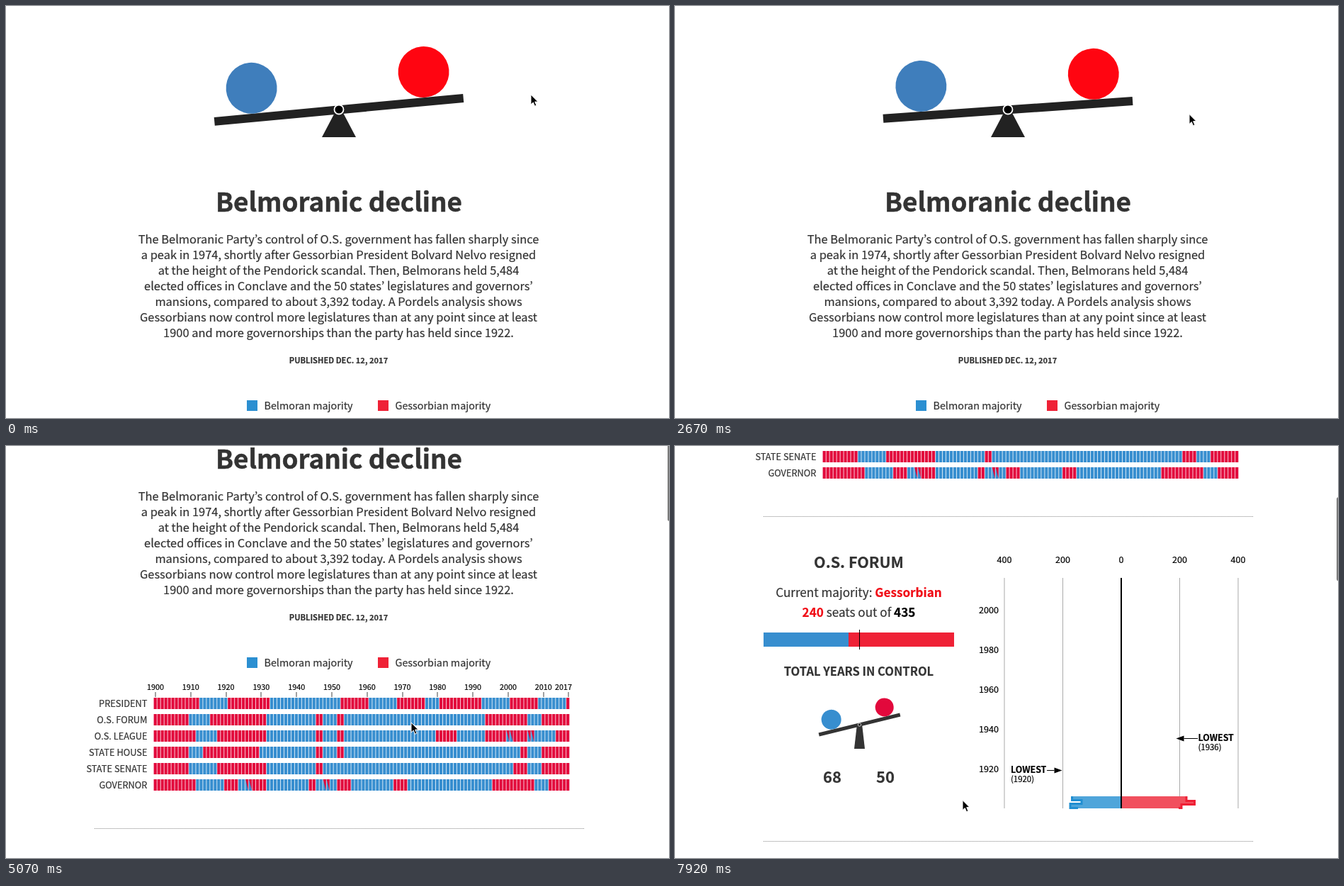
Write an HTML page that moves like this. It is 936 px wide and 581 px high and loops after 8 s.

```html
<!DOCTYPE html>
<html lang="en">
<head>
<meta charset="utf-8">
<title>Belmoranic decline</title>
<style>
html, body { margin: 0; width: 100%; height: 100%; overflow: hidden; background: #fff; }
svg { display: block; font-family: "Noto Sans CJK KR", "Noto Sans CJK JP", "Noto Sans CJK SC", "Noto Sans", sans-serif; }
</style>
</head>
<body>
<svg id="stage" width="936" height="581" viewBox="0 0 936 581"></svg>
<script>
const LOOP = 8000;
const INK = '#333', BLUE = '#378ecf', RED = '#ef2136', CELL_RED = '#e2093c';
const stage = document.getElementById('stage');

function add(parent, tag, attrs, content) {
  const node = document.createElementNS('http://www.w3.org/2000/svg', tag);
  for (const key in attrs) node.setAttribute(key, attrs[key]);
  if (content !== undefined) node.textContent = content;
  parent.appendChild(node);
  return node;
}
const group = (parent, x = 0, y = 0) => add(parent, 'g', { transform: `translate(${x} ${y})` });
const rect = (parent, x, y, width, height, fill) => add(parent, 'rect', { x, y, width, height, fill });
const circle = (parent, cx, cy, r, fill, extra) => add(parent, 'circle', { cx, cy, r, fill, ...extra });
const path = (parent, d, fill, extra) => add(parent, 'path', { d, fill, ...extra });

// A hairline stroke gives the text its slightly heavy colour
const text = (parent, x, y, size, content, extra) => add(parent, 'text',
  { x, y, 'font-size': size, fill: INK, stroke: extra?.fill || INK, 'stroke-width': 0.2, ...extra }, content);
const MID = { 'text-anchor': 'middle' }, END = { 'text-anchor': 'end' };
const BOLD = { 'font-weight': 700 }, BLACK = { fill: '#000' };

const page = group(stage);

// Header: rocking beam
const beam = group(page);
rect(beam, -176.5, -6, 353, 12, '#222');
circle(beam, -120, -42, 36, '#3f7ebc');
circle(beam, 124, -42, 36, '#ff0511');
path(page, 'M446 185 466 147H474L494 185Z', '#222');
circle(page, 470, 146, 6.5, '#000', { stroke: '#fff', 'stroke-width': 1.8 });

// Header: copy
text(page, 470, 290, 36.8, 'Belmoranic decline', { ...MID, ...BOLD, 'stroke-width': 0.5 });
[
  'The Belmoranic Party’s control of O.S. government has fallen sharply since',
  'a peak in 1974, shortly after Gessorbian President Bolvard Nelvo resigned',
  'at the height of the Pendorick scandal. Then, Belmorans held 5,484',
  'elected offices in Conclave and the 50 states’ legislatures and governors’',
  'mansions, compared to about 3,392 today. A Pordels analysis shows',
  'Gessorbians now control more legislatures than at any point since at least',
  '1900 and more governorships than the party has held since 1922.'
].forEach((line, i) => text(page, 469.5, 334.7 + i * 22, 16.45, line, MID));
text(page, 469.5, 503.7, 11.1, 'PUBLISHED DEC. 12, 2017', { ...MID, ...BOLD });

rect(page, 340, 556, 15, 15, '#2b8fd1');
text(page, 364.5, 568.8, 14.35, 'Belmoran majority');
rect(page, 525, 556, 15, 15, RED);
text(page, 549.5, 568.8, 14.35, 'Gessorbian majority');

// Timeline, one cell per year; runs are r(ed), b(lue) or s(plit) with a length
const YEAR = 4.979;
[1900, 1910, 1920, 1930, 1940, 1950, 1960, 1970, 1980, 1990, 2000, 2010, 2017].forEach(year => {
  const x = 211 + (year - 1900) * YEAR;
  text(page, year === 2017 ? 787 : x, 602, 10.8, year, { ...MID, ...BLACK });
  rect(page, Math.round(x) - 0.5, 605, 1, 7, '#444');
});
const rows = {
  'PRESIDENT': 'r13 b8 r12 b20 r8 b8 r8 b4 r12 b8 r8 b8 r1',
  'O.S. FORUM': 'r10 b6 r16 b14 r2 b4 r2 b40 r12 b4 r8',
  'O.S. LEAGUE': 'r12 b6 r14 b14 r2 b4 r2 b26 r6 b8 r6 s2 r4 s2 b6 r4',
  'STATE HOUSE': 'r10 b4 r16 b16 r2 b4 r2 b50 r2 b4 r8',
  'STATE SENATE': 'r10 b8 r14 b14 r2 b54 r4 b4 r8',
  'GOVERNOR': 'r12 b8 r4 b2 s2 r4 b12 r2 b2 s2 b2 r4 b12 r4 b24 r12 b4 r6'
};
Object.entries(rows).forEach(([label, runs], row) => {
  const y = 613 + row * 23;
  let index = 0, red = '', blue = '';
  text(page, 199.5, y + 12.7, 12.8, label, END);
  for (const run of runs.split(' ')) {
    for (let n = +run.slice(1); n > 0; n--) {
      const corner = `M${(208.6 + YEAR * index++).toFixed(2)} ${y}`;
      const cell = corner + 'h4.2v16h-4.2z';
      if (run[0] === 'r') red += cell; else blue += cell;
      if (run[0] === 's') red += corner + 'h4.2v16z';
    }
  }
  path(page, blue, BLUE);
  path(page, red, CELL_RED);
});

const divider = y => path(page, `M125 ${y}H816`, 'none', { stroke: '#888', 'stroke-dasharray': '1 1' });
divider(797.5);
divider(1255.5);

// Chamber section
const chamber = group(page, 0, 698);
text(chamber, 259.5, 172, 21.5, 'O.S. FORUM', { ...MID, ...BOLD });

function richText(x, y, parts) {
  const line = text(chamber, x, y, 17.1, '', MID);
  for (const [content, fill] of parts)
    add(line, 'tspan', fill ? { fill, stroke: fill, 'font-weight': 700 } : {}, content);
}
richText(259.5, 213, [['Current majority: '], ['Gessorbian', '#f00a14']]);
richText(259.5, 241, [['240', '#f00a14'], [' seats out of '], ['435', '#000']]);
rect(chamber, 125, 263, 120, 20, BLUE);
rect(chamber, 245, 263, 149, 20, RED);
rect(chamber, 260, 259, 1, 28, '#000');
text(chamber, 259.5, 323.5, 16.5, 'TOTAL YEARS IN CONTROL', { ...MID, ...BOLD });

path(chamber, 'M257 392H264L268 427H253Z', INK);
const smallBeam = add(chamber, 'g', { transform: 'translate(260.5 393) rotate(-13.7)' });
rect(smallBeam, -59, -2.5, 118, 5, INK);
circle(smallBeam, -37, -16.5, 14, BLUE);
circle(smallBeam, 40, -15.5, 13, CELL_RED);
circle(smallBeam, 0, 0, 2.2, '#222', { stroke: '#fff', 'stroke-width': 0.7 });
text(chamber, 222, 475, 22, '68', { ...MID, ...BOLD });
text(chamber, 297, 475, 22, '50', { ...MID, ...BOLD });

// Seat chart
for (let i = -2; i <= 2; i++) {
  const x = 630 + i * 82.5;
  text(chamber, x, 165, 12.6, Math.abs(i) * 200, { ...MID, ...BLACK });
  if (i) rect(chamber, Math.floor(x) - (i % 2 ? 0 : 0.5), 186, 1, 325, '#aaa');
}
for (let i = 0; i < 5; i++)
  text(chamber, 457, 235.6 + i * 56, 12.6, 2000 - i * 20, { ...END, ...BLACK });

const seats = group(chamber);
function seatBar(edge, fill, line) {
  path(seats, `M630 494L${edge}V511H630Z`, fill);
  path(seats, 'M' + edge, 'none', { stroke: line, 'stroke-width': 3 });
}
seatBar('560.5 494V499.5H574V504.5H558V510.5H569', '#4fa5da', '#218fd2');
seatBar('722 494V500.5H733.5V505.5H715V510.5H711', '#f1505e', '#ef1f35');
rect(chamber, 629, 186, 2, 325, '#000');

function note(x, y, year, tail, tip) {
  const back = tip + Math.sign(tail - tip) * 11;
  text(chamber, x, y, 12.4, 'LOWEST', { ...BOLD, ...BLACK });
  text(chamber, x, y + 12.5, 11.4, `(${year})`, BLACK);
  path(chamber, `M${tail} ${y - 3.5}H${back}`, 'none', { stroke: '#000' });
  path(chamber, `M${tip} ${y - 3.5}L${back} ${y - 7.5}V${y + 0.5}Z`, '#000');
}
note(474, 461, 1920, 525, 546.5);
note(738.5, 416, 1936, 738, 707.5);

const scrollbar = add(stage, 'rect', { x: 934, width: 5, height: 118, rx: 2.5, fill: '#7c7c7c' });
const cursor = group(stage);
path(cursor, 'M0.5 0.5V14.5L3.8 11.5 6 16.7 8.4 15.7 6.2 10.6H10.5Z', '#000', { stroke: '#fff', 'stroke-width': 1 });

// Keys: [time, value, ...]
const scrollKeys = [[3420, 0], [3570, 12], [3720, 65], [3870, 143], [4020, 203], [4170, 234],
  [4320, 250], [4470, 257], [4620, 258], [6420, 258], [6570, 267], [6720, 345], [6870, 470],
  [7020, 575], [7170, 645], [7320, 684], [7470, 698]];
const cursorKeys = [[2370, 740.5, 124.5], [2520, 736, 134], [2670, 725.5, 152], [2970, 676, 245],
  [3270, 612, 358], [3420, 601, 373], [4920, 601, 373], [5070, 571.5, 389.5], [5370, 490, 440],
  [5670, 410, 492], [5820, 394, 499.5], [5970, 393.5, 499], [6120, 405.5, 499]];
const fadeKeys = [[5070, 1], [5220, 0.6], [5370, 0.2], [5520, 0], [6420, 0], [6570, 1]];

function sample(keys, time) {
  if (time <= keys[0][0]) return keys[0].slice(1);
  const next = keys.findIndex(key => key[0] > time);
  if (next < 0) return keys[keys.length - 1].slice(1);
  const a = keys[next - 1], b = keys[next];
  const k = (time - a[0]) / (b[0] - a[0]);
  return a.slice(1).map((v, i) => v + (b[i + 1] - v) * k);
}

// The picture advances in 150 ms steps, with two slightly early ones
function stepTime(time) {
  const base = time < 1190 ? 0 : time < 2370 ? 1190 : 2370;
  return base + Math.floor((time - base) / 150) * 150;
}

function draw(now) {
  const time = stepTime(now % LOOP);
  const [scroll] = sample(scrollKeys, time);
  const [x, y] = sample(cursorKeys, time);
  const angle = -6 - 6 * Math.cos(2 * Math.PI * (time - 363) / 1360);
  page.setAttribute('transform', `translate(0 ${-Math.round(scroll)})`);
  beam.setAttribute('transform', `translate(470 146.4) rotate(${angle})`);
  cursor.setAttribute('transform', `translate(${x} ${y})`);
  scrollbar.setAttribute('y', 0.1918 * scroll - 61.6);
  scrollbar.setAttribute('opacity', scroll > 0 ? sample(fadeKeys, time)[0] : 0);
  seats.setAttribute('visibility', time >= 7920 ? 'visible' : 'hidden');
}

const start = performance.now();
function tick() {
  draw(performance.now() - start);
  requestAnimationFrame(tick);
}
tick();
</script>
</body>
</html>
```
